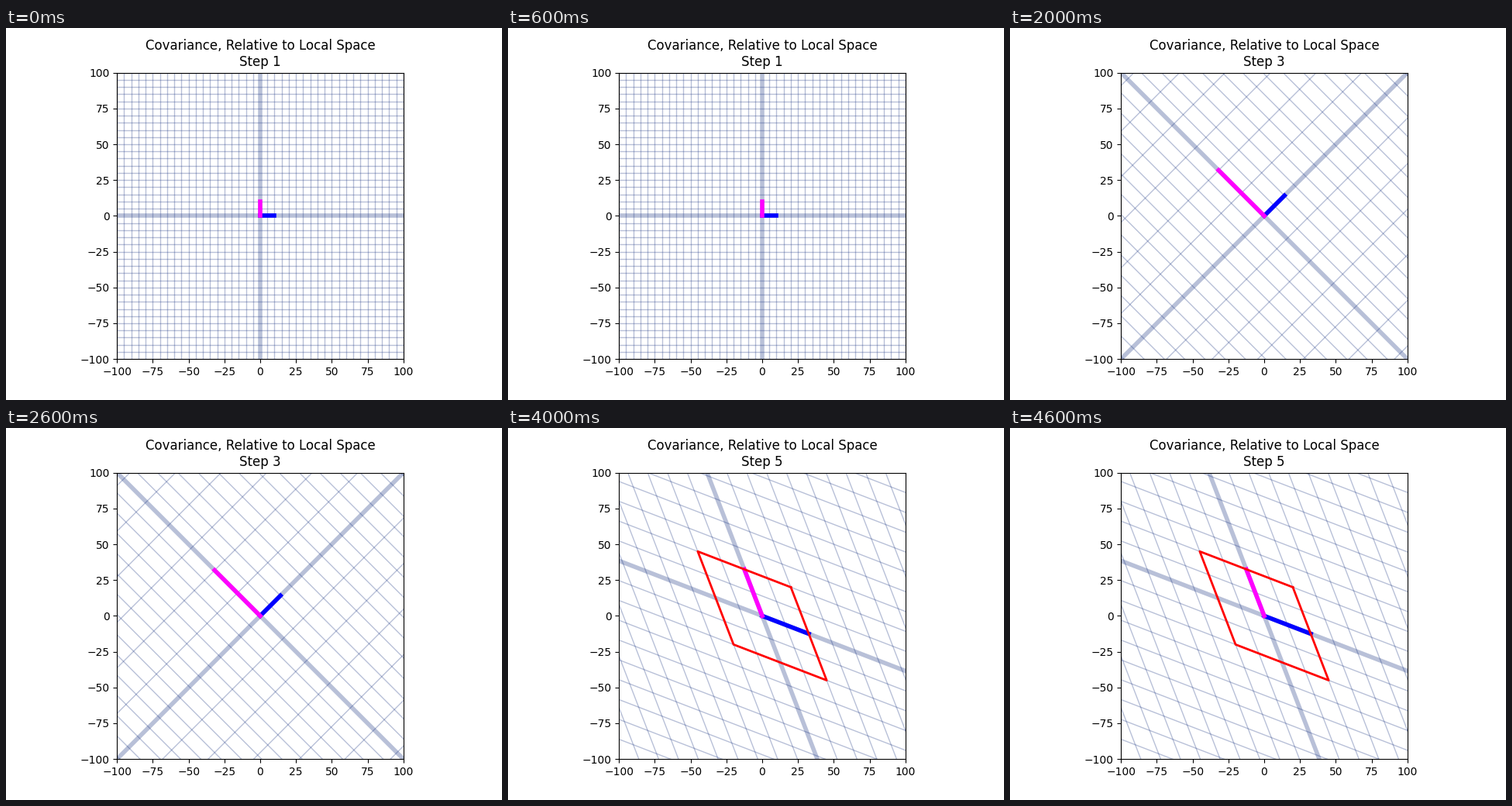
A matplotlib script that plays this animation: 640 px wide and 480 px high, repeating every 5 s.

```python
import numpy as np
import matplotlib.pyplot as plt
from matplotlib.animation import FuncAnimation

LIMIT = 100
REACH = 200
SPACING = 5
UNIT = 10
GRID_COLOR = "#15307f"
GRID_ALPHA = 0.3

plt.rcParams["font.family"] = "DejaVu Sans"

# Symmetric matrix built up as rotation, scaling and rotation back.
c = np.sqrt(0.5)
rotation = np.array([[c, -c], [c, c]])
scaling = np.diag([2, 4.5])
symmetric = rotation @ scaling @ rotation.T
steps = [np.eye(2), rotation, rotation @ scaling, symmetric, symmetric]

fig, ax = plt.subplots(figsize=(6.4, 4.8), dpi=100)
ax.set_aspect("equal")
ax.set_xlim(-LIMIT, LIMIT)
ax.set_ylim(-LIMIT, LIMIT)


def add_line(points, **style):
    """Plot a polyline and keep its untransformed points with it."""
    points = np.array(points, dtype=float).T
    line, = ax.plot(*points, **style)
    return line, points


shapes = []
for vertical in (True, False):
    for k in range(-REACH, REACH + 1, SPACING):
        ends = [(k, -REACH), (k, REACH)]
        if not vertical:
            ends = [(y, x) for x, y in ends]
        shapes.append(add_line(ends, color=GRID_COLOR, alpha=GRID_ALPHA,
                               lw=1 if k else 4))

shapes.append(add_line([(0, 0), (UNIT, 0)], color="blue", lw=4))
shapes.append(add_line([(0, 0), (0, UNIT)], color="magenta", lw=4))

corners = UNIT * np.array([(1, 1), (1, -1), (-1, -1), (-1, 1), (1, 1)])
outline = add_line(corners, color="red", lw=2)
shapes.append(outline)


def update(i):
    for line, points in shapes:
        line.set_data(*(steps[i] @ points))
    outline[0].set_visible(i == len(steps) - 1)
    ax.set_title(f"Covariance, Relative to Local Space\nStep {i + 1}")


anim = FuncAnimation(fig, update, frames=len(steps), interval=1000,
                     repeat=True, repeat_delay=0)
plt.show()
```
